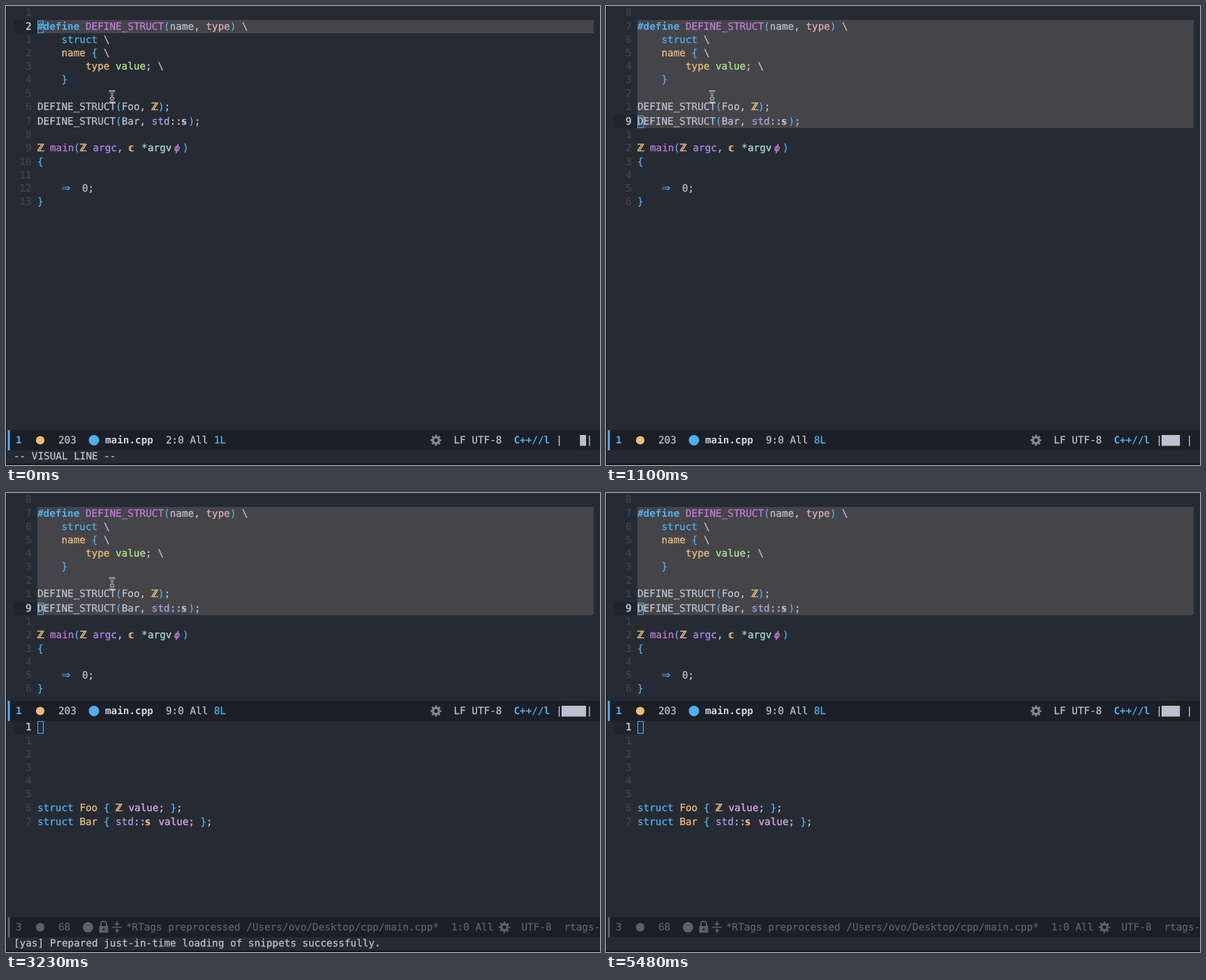
Recreate the animation shown at these times as an HTML page. Size 851 by 658 pixels, loop 5580 ms.

```html
<!DOCTYPE html>
<html lang="en">
<head>
<meta charset="utf-8">
<title>Macro preprocessing</title>
<style>
html, body { margin: 0; width: 100%; height: 100%; overflow: hidden; background: #262b33; }
svg { display: block; width: 851px; height: 658px; }
text { font: 14.32px "DejaVu Sans Mono", monospace; white-space: pre; text-rendering: geometricPrecision; stroke-width: .25px; }
.b { font-weight: bold; stroke-width: 0; }
.m { font: 14px "DejaVu Sans", sans-serif; stroke-width: .6px; }
.a { font: 15.5px "DejaVu Sans", sans-serif; stroke-width: 0; }
.p { font: italic 13.5px "DejaVu Sans Mono", monospace; stroke-width: .5px; }
</style>
</head>
<body>
<svg viewBox="0 0 851 658" xmlns="http://www.w3.org/2000/svg">
  <g id="scene"></g>
  <g id="mouse" fill="none" stroke-linecap="round">
    <path stroke="#e8eaee" stroke-width="2.7" d="M-3-8Q0-8 0-5.5Q0-8 3-8M0-5.5V5.5M-3 8Q0 8 0 5.5Q0 8 3 8M-2 2.5H2"/>
    <path stroke="#15171b" stroke-width="1" d="M-3-8Q0-8 0-5.5Q0-8 3-8M0-5.5V5.5M-3 8Q0 8 0 5.5Q0 8 3 8M-2 2.5H2"/>
  </g>
</svg>
<script>
const LOOP = 5580, CELL = 8.62;
const FG = '#bbc2cf', BLUE = '#51afef', GOLD = '#ecbe7b', PINK = '#c678dd', LILAC = '#a9a1e1',
  VIOLET = '#b18cf0', MINT = '#a5e3d0', GREEN = '#aef08c', ROSE = '#dcaeb4', PLUM = '#dcaeea',
  DIM = '#5b6268', FAINT = '#3f444a', BAR = '#1c1f25', HL = '#20242b', GREY = '#7d8288';

const scene = document.getElementById('scene');
const mouse = document.getElementById('mouse');

const esc = s => String(s).replace(/&/g, '&amp;').replace(/</g, '&lt;');
const text = (x, y, s, color = FG, cls = '') =>
  `<text x="${x}" y="${y}" fill="${color}" stroke="${color}" class="${cls}">${esc(s)}</text>`;
const rect = (x, y, w, h, fill) => `<rect x="${x}" y="${y}" width="${w}" height="${h}" fill="${fill}"/>`;
const disc = (x, y, r, fill) => `<circle cx="${x}" cy="${y}" r="${r}" fill="${fill}"/>`;
const box = (x, y, h = 17) =>
  `<rect x="${x}" y="${y}" width="8" height="${h}" fill="none" stroke="${BLUE}"/>`;

// Each line: [x, text, color, class] runs
const macroCall = [[45, 'DEFINE_STRUCT'], [157, '(', BLUE]];
const code = [
  [],
  [[45, '#define', BLUE, 'b'], [114, 'DEFINE_STRUCT', PINK], [226, '(', BLUE], [234.7, 'name,'],
    [286.5, 'type', ROSE], [321, ')', BLUE], [338, '\\']],
  [[79.5, 'struct', BLUE], [140, '\\']],
  [[79.5, 'name', GOLD], [122.6, '{', BLUE], [140, '\\']],
  [[114, 'type', GOLD], [157, 'value', GREEN], [200, ';'], [217.4, '\\']],
  [[79.5, '}', BLUE]],
  [],
  [...macroCall, [165.7, 'Foo,'], [208, 'ℤ', GOLD, 'm'], [218, ')', BLUE], [226.7, ';']],
  [...macroCall, [165.7, 'Bar,'], [208.8, 'std', LILAC], [234.7, '::'], [251.5, '𝕤', FG, 'm'],
    [261.5, ')', BLUE], [270, ';']],
  [],
  [[44.5, 'ℤ', GOLD, 'm'], [63, 'main', PINK], [97, '(', BLUE], [105.5, 'ℤ', GOLD, 'm'],
    [124.5, 'argc', VIOLET], [159, ','], [175.5, '𝕔', GOLD, 'm'], [194, '*'], [203, 'argv', MINT],
    [241, 'ϕ', PINK, 'p'], [253, ')', BLUE]],
  [[45, '{', BLUE]],
  [],
  [[79.5, '⇒', BLUE, 'a'], [109, '0;']],
  [[45, '}', BLUE]]
];
const expanded = [
  [], [], [], [], [], [],
  [[45, 'struct', BLUE], [105.4, 'Foo', GOLD], [140, '{', BLUE], [156.5, 'ℤ', GOLD, 'm'],
    [175.5, 'value', PLUM], [218.6, ';'], [235.5, '}', BLUE], [244, ';']],
  [[45, 'struct', BLUE], [105.4, 'Bar', GOLD], [140, '{', BLUE], [157, 'std', LILAC], [183, '::'],
    [199.5, '𝕤', GOLD, 'm'], [218.5, 'value', PLUM], [261.6, ';'], [278.5, '}', BLUE], [287, ';']]
];
const commands = [
  ['rtags-preprocess-file', 'Preprocess selected region or buffer.'],
  ['toggle-transparency', 'Toggle between transparent and opaque state'],
  ['rtags-find-symbol-at-point', 'Find the natural target for the symbol under'],
  ['rtags-start-process-unless-running', 'Launch the RTags process (rdm) if it’s not'],
  ['rtags-find-virtuals-at-point', 'List all reimplementations of function under'],
  ['package-refresh-contents', 'Download descriptions of all configured ELPA'],
  ['auto-package-update-now', 'Update installed Emacs packages.'],
  ['org-mode', 'Outline-based notes management and organizer'],
  ['grab-mac-link', 'Prompt for an application to grab a link from']
];

// Rows holding a double-struck glyph are slightly taller
const codeY = i => 14.3 + 19.2 * i + (i > 7 ? 1.6 : 0) + (i > 10 ? .4 : 0);
const expandedY = i => 340.3 + 19.2 * i + (i > 6 ? 1.6 : 0);

function buffer(lines, rowY, cur) {
  let out = rect(11, Math.round(rowY(cur) - 13.8), 34, 19, HL);
  lines.forEach((runs, i) => {
    const y = rowY(i), n = i === cur ? i + 1 : Math.abs(i - cur);
    out += text(36.5 - CELL * String(n).length, y, n, i === cur ? '#d5dae3' : FAINT);
    out += runs.map(([x, s, color, cls]) => text(x, y, s, color, cls)).join('');
  });
  return out + box(45.5, Math.round(rowY(cur) - 13) + .5);
}

const gear = (x, y, color) =>
  `<g transform="translate(${x} ${y})" fill="none" stroke="${color}">
  <circle r="6.6" stroke-width="2.6" stroke-dasharray="2.7 2.484" stroke-dashoffset="1.35"/>
  <circle r="4.3" stroke-width="3.2"/></g>`;

function spinner(step, y) {
  const s = step % 8, first = Math.max(0, s - 4), last = Math.min(4, s), w = 8.75;
  return text(788.2, y + 5, '|') + text(831.5, y + 5, '|') +
    (last > first ? rect(796 + first * w, y - 7, (last - first) * w, 15.5, FG) : '');
}

function modeline(y, line, count, step) {
  const b = y + 5.2, pos = line + ':0 All';
  return rect(0, y - 14, 851, 29, BAR) + rect(2.5, y - 14, 3, 29, BLUE) +
    text(14, b, '1', BLUE, 'b') + disc(49, y + .5, 6.1, GOLD) + text(75, b, '203') +
    disc(126, y + .5, 7.5, BLUE) + text(142, b, 'main.cpp', '#d0d6e0', 'b') +
    text(229, b, pos) + text(229 + CELL * (pos.length + 1), b, count + 'L', BLUE) +
    gear(616, y + .5, '#85888c') + text(641.5, b, 'LF UTF-8') +
    text(727.5, b, 'C++//l', BLUE, 'b') + spinner(step, y);
}

function idleModeline() {
  const y = 622, b = 627.2;
  return rect(0, 608, 851, 29, BAR) + rect(2.5, 608, 3, 29, DIM) +
    text(14, b, '3', DIM) + disc(49, 622.5, 6.1, DIM) + text(75, b, '68', DIM) +
    disc(117.5, 622.5, 7.5, DIM) +
    `<path d="M136 622V618a4 4 0 0 1 8 0V622" fill="none" stroke="${DIM}" stroke-width="2"/>` +
    rect(133.5, 621, 13, 9.5, DIM) + disc(140, 625.5, 1.5, BAR) +
    `<path d="M152 622.5H166M159 614V619M159 631V626M156.5 617L159 619.5L161.5 617M156.5 628L159 625.5L161.5 628" fill="none" stroke="${DIM}" stroke-width="1.7"/>` +
    text(172, b, '*RTags preprocessed /Users/ovo/Desktop/cpp/main.cpp*', DIM) +
    text(638, b, '1:0 All', DIM) + gear(714, y + .5, DIM) +
    text(738.5, b, 'UTF-8', DIM) + text(799.5, b, 'rtags-', DIM);
}

const cube = y =>
  `<g transform="translate(35.5 ${y})"><path d="M0-8L7-4.5V4.5L0 8L-7 4.5V-4.5Z" fill="${LILAC}"/>
  <path d="M-5.5-4L0-1.2L5.5-4M0-1.2V6.5" fill="none" stroke="#262b33" stroke-width="1.3"/></g>`;

function palette(pressed) {
  let out = text(11, 478, '(    1/10497) M-x', BLUE) + rect(45, 482, 766, 18, '#2257a0') +
    '<path d="M12 487.5L16.5 491.5L12 495.5" fill="none" stroke="#bbc2cf" stroke-width="1.8"/>';
  commands.forEach(([name, about], i) => {
    const y = 491.3 + 18.2 * i;
    out += cube(y) + text(53, y + 4.8, name) +
      `<svg width="843" height="658">${text(491.5, y + 4.8, about, GREY)}</svg>`;
    if (about.length > 40)
      out += `<path d="M844 ${y}H849M846.5 ${y - 2.5}L849 ${y}L846.5 ${y + 2.5}" fill="none" stroke="${FAINT}"/>`;
  });
  return out + (pressed ? box(11.5, 465.5, 16) : '');
}

// [start, value] pairs, the last one reached wins
const at = (track, t) => track.filter(k => k[0] <= t).pop();
const lineTrack = [[0, 2], [130, 3], [260, 4], [360, 5], [460, 6], [495, 7], [530, 8], [570, 9], [1492, 10], [3180, 9]];
// [start, first step, period]
const spinTrack = [[0, 7, 1e4], [60, 8, 100], [630, 6, 94], [1210, 4, 94], [1800, 2, 1e4], [3180, 3, 1e4],
  [3230, 4, 1e4], [3350, 5, 90], [3830, 2, 103], [4420, 0, 94], [5010, 6, 94]];
// [time, x, y]
const path = [[0, 152, 130], [3960, 152, 130], [4180, 316, 204], [4360, 670, 430],
  [4640, 785, 560], [4950, 845, 645], [5060, 865, 680], [LOOP, 865, 680]];

function pointer(t) {
  const i = path.findIndex(p => p[0] > t), a = path[i - 1], b = path[i];
  const k = (t - a[0]) / (b[0] - a[0]);
  return [a[1] + (b[1] - a[1]) * k, a[2] + (b[2] - a[2]) * k];
}

let shown = '';
function draw(t) {
  const line = at(lineTrack, t)[1];
  const [start, first, period] = at(spinTrack, t);
  const step = first + Math.floor((t - start) / period + 1e-6);
  const prompt = t >= 1492 && t < 3180, split = t >= 3180, pressed = prompt && t >= 2820;
  const note = t < 200 ? '-- VISUAL LINE --'
    : t >= 3230 && t < 3920 ? '[yas] Prepared just-in-time loading of snippets successfully.' : '';

  const key = [line, step, prompt, split, pressed, note].join();
  if (key !== shown) {
    shown = key;
    const last = Math.min(line, 9);
    const bottom = Math.round(codeY(last - 1) + 5.4);
    scene.innerHTML = rect(0, 0, 851, 658, '#262b33') + rect(45, 20, 797, bottom - 20, '#454549') +
      buffer(code, codeY, line - 1) +
      modeline(prompt ? 450 : split ? 312 : 622, line, last - 1, step) +
      (split ? buffer(expanded, expandedY, 0) + idleModeline() : '') +
      (prompt ? palette(pressed) : '') + text(11, 650.3, note) +
      rect(0, 0, 1, 658, '#14161a') + rect(0, 656, 851, 2, '#121418');
  }
  const [x, y] = pointer(t);
  mouse.setAttribute('transform', `translate(${x} ${y})`);
}

const begin = performance.now();
function tick() {
  draw((performance.now() - begin) % LOOP);
  requestAnimationFrame(tick);
}
tick();
</script>
</body>
</html>
```
